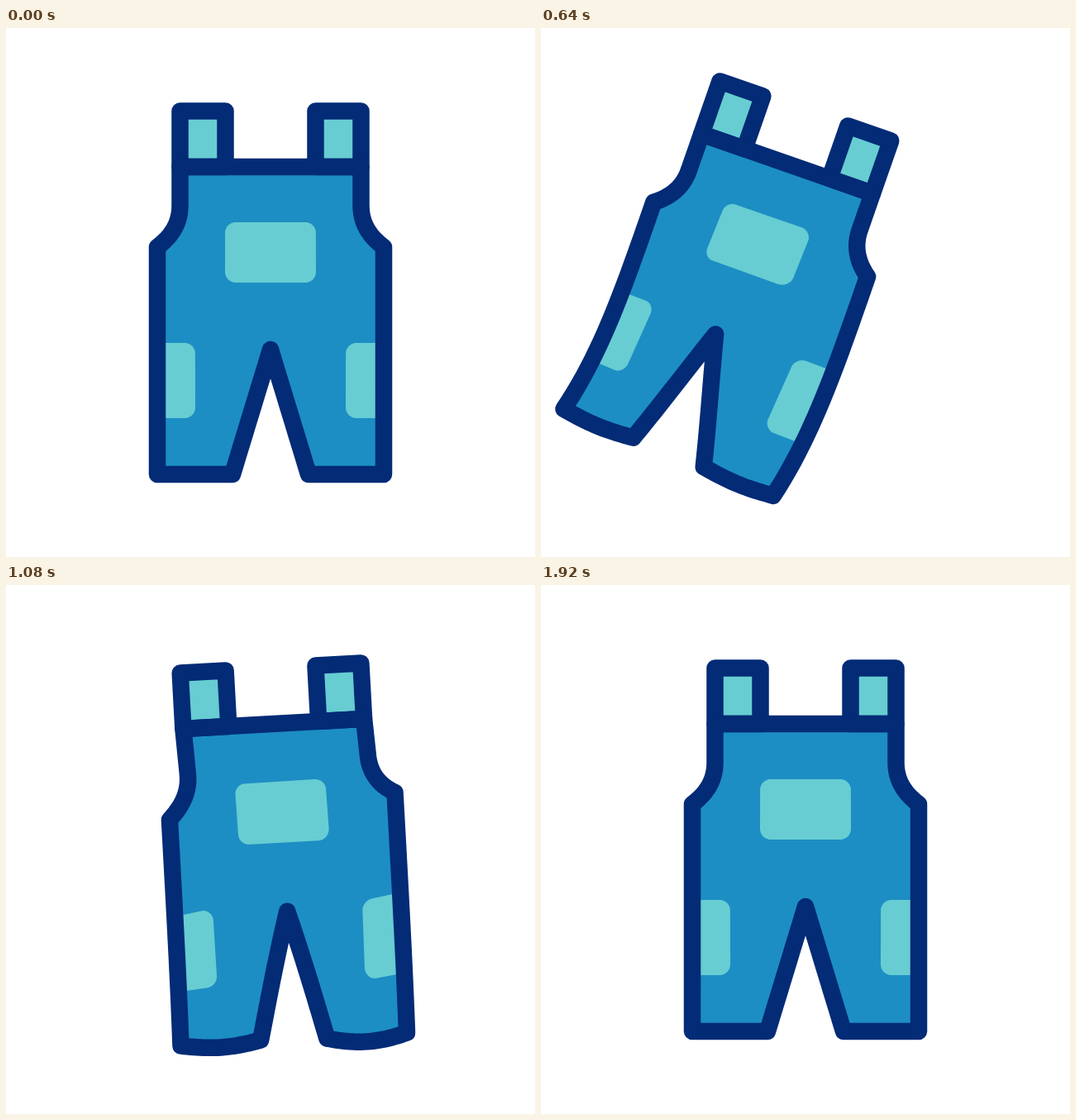
An HTML page with a canvas that plays this animation: 640 by 640 pixels, repeating every 2200 ms.

```html
<!DOCTYPE html>
<html lang="en">
<head>
<meta charset="utf-8">
<title>Swinging dungarees</title>
<style>
  html, body { margin: 0; height: 100%; overflow: hidden; background: #fff; }
  canvas { display: block; width: 100vmin; height: 100vmin; }
</style>
</head>
<body>
<canvas width="640" height="640"></canvas>
<script>
const ctx = document.querySelector('canvas').getContext('2d');
const NAVY = '#032b76', BLUE = '#1c8ec4', TEAL = '#67cdd2';
const LOOP = 2200, STEP = 40;

// All shapes are measured from the pivot between the straps.
const PIVOT = { x: 320, y: 100 };
const BAND = 68, HIP = 165, HEM = 440;
const HALF_WIDTH = 137, STRAP_EDGE = 109.5, HEM_INNER = 46;

// drag: 1 pulls the cloth to the left, -1 to the right
const KEYS = [
  { time: 200, angle: 0, drag: 0 },
  { time: 680, angle: 19.6, drag: 1 },
  { time: 960, angle: -13.5, drag: -1 },
  { time: 1200, angle: 7.2, drag: 1 },
  { time: 1440, angle: -4, drag: 0 },
  { time: 1680, angle: 2, drag: 0 },
  { time: 1920, angle: 0, drag: 0 },
];

const clamp = v => Math.min(1, Math.max(0, v));
const mix = (a, b, u) => a + (b - a) * u;
const range = (n, f) => Array.from({ length: n }, (_, i) => f(i / n));

function poseAt(time) {
  const i = KEYS.findIndex(key => key.time > time);
  if (i <= 0) return { angle: 0, left: 0, right: 0 };
  const a = KEYS[i - 1], b = KEYS[i];
  const p = (time - a.time) / (b.time - a.time);
  const u = p * p * (3 - 2 * p);
  return {
    angle: mix(a.angle, b.angle, u),
    left: mix(clamp(a.drag), clamp(b.drag), u),
    right: mix(clamp(-a.drag), clamp(-b.drag), u),
  };
}

// Bends the cloth: nothing moves at the band, the hems move most.
function warp([x, y], { left, right }) {
  const u = x / HALF_WIDTH;
  const chest = clamp((y - BAND) / (HIP - BAND));
  const leg = clamp((y - HIP) / (HEM - HIP));
  const bend = leg ** (0.5 + 3 * u * u);
  const pinch = leg ** 2 * u * Math.max(0, 1 - u * u) ** 3;
  const acrossLeg = clamp((Math.abs(x) - HEM_INNER) / (HALF_WIDTH - HEM_INNER));
  const sag = leg ** 4 * Math.sin(Math.PI * acrossLeg);

  const dx = left * -21 * bend
    + right * (10 * chest + 18 * bend - 50 * pinch);
  const dy = left * (leg * (5 + 8 * u) + 3.5 * sag)
    + right * (clamp(2 * chest) * (6 - 18 * u ** 3) + leg * (10 + 9 * u ** 3) + 9 * sag);
  return [x + dx, y + dy];
}

const line = ([x0, y0], [x1, y1]) =>
  range(24, t => [mix(x0, x1, t), mix(y0, y1, t)]);

const curve = ([x0, y0], [cx, cy], [x1, y1]) => range(12, t => [
  mix(mix(x0, cx, t), mix(cx, x1, t), t),
  mix(mix(y0, cy, t), mix(cy, y1, t), t),
]);

function bodyOutline() {
  const top = [-STRAP_EDGE, BAND], arm = [-STRAP_EDGE, 115], hip = [-HALF_WIDTH, HIP];
  const hem = [-HALF_WIDTH, HEM], inner = [-HEM_INNER, HEM], crotch = [0, 289];
  const half = [
    ...line(top, arm), ...curve(arm, [-STRAP_EDGE, 145], hip),
    ...line(hip, hem), ...line(hem, inner), ...line(inner, crotch), crotch,
  ];
  const mirrored = half.map(([x, y]) => [-x, y]).reverse();
  return [...half, ...mirrored];
}

function pocketOutline(cx, cy, w, h, r = 13) {
  return range(48, t => {
    const cos = Math.cos(t * 2 * Math.PI), sin = Math.sin(t * 2 * Math.PI);
    const sx = Math.sign(cos + 1e-9), sy = Math.sign(sin + 1e-9);
    return [cx + sx * (w / 2 - r) + r * cos, cy + sy * (h / 2 - r) + r * sin];
  });
}

const BODY = bodyOutline();
const POCKETS = [
  pocketOutline(0, 171.5, 110, 73),
  pocketOutline(-141, 326.5, 100, 91),
  pocketOutline(141, 326.5, 100, 91),
];
const STRAPS = new Path2D();
STRAPS.rect(-STRAP_EDGE, 0.5, 55, 67.5);
STRAPS.rect(STRAP_EDGE - 55, 0.5, 55, 67.5);

function clothPath(points, pose) {
  const path = new Path2D();
  points.forEach(point => path.lineTo(...warp(point, pose)));
  path.closePath();
  return path;
}

function draw(time) {
  const pose = poseAt(time);
  const body = clothPath(BODY, pose);

  ctx.fillStyle = '#fff';
  ctx.fillRect(0, 0, 640, 640);
  ctx.save();
  ctx.translate(PIVOT.x, PIVOT.y);
  ctx.rotate(pose.angle * Math.PI / 180);

  ctx.fillStyle = BLUE;
  ctx.fill(body);
  ctx.fillStyle = TEAL;
  ctx.fill(STRAPS);
  ctx.save();
  ctx.clip(body);
  POCKETS.forEach(pocket => ctx.fill(clothPath(pocket, pose)));
  ctx.restore();

  ctx.strokeStyle = NAVY;
  ctx.lineWidth = 20.5;
  ctx.lineJoin = 'round';
  ctx.stroke(STRAPS);
  ctx.stroke(body);
  ctx.restore();
}

function tick() {
  const time = performance.now() % LOOP;
  draw(Math.floor(time / STEP) * STEP);
  requestAnimationFrame(tick);
}
tick();
</script>
</body>
</html>
```
